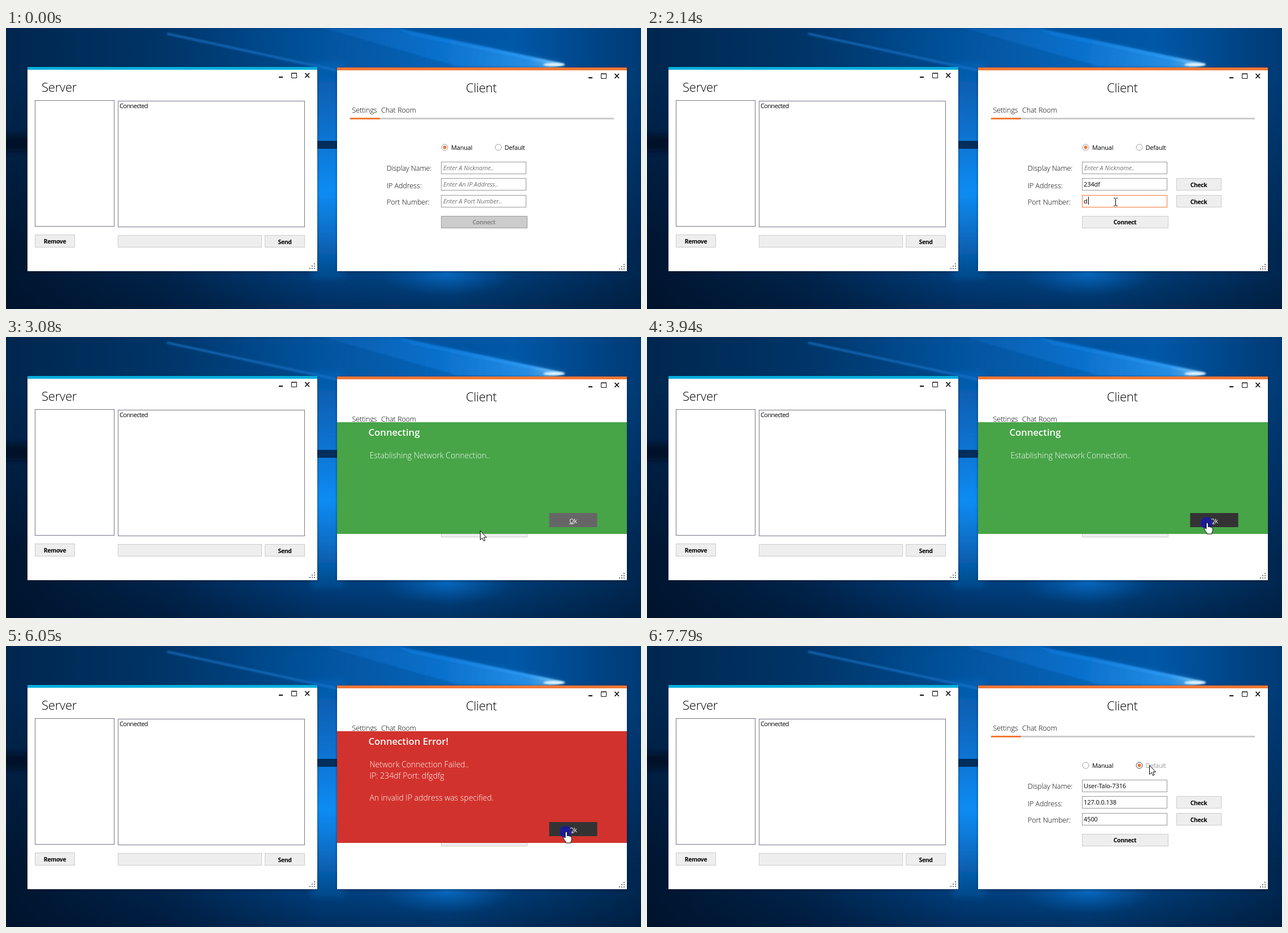
Recreate the animation shown at these times as an HTML page. Size 1124 by 498 pixels, loop 8 s.

```html
<!DOCTYPE html>
<html lang="en">
<head>
<meta charset="utf-8">
<title>Chat connection demo</title>
<style>
html, body { margin: 0; width: 100%; height: 100%; overflow: hidden; background: #012a57; }
svg { display: block; width: 100%; height: 100%; }
text { font: 11px "Open Sans", "Noto Sans", sans-serif; letter-spacing: -.2px; fill: #000; white-space: pre; }
.title { font-size: 22.2px; font-weight: 300; letter-spacing: -.3px; }
.label { font-size: 12.6px; font-weight: 300; letter-spacing: -.1px; }
.value { font-size: 11px; letter-spacing: -.1px; }
.hint { font-style: italic; letter-spacing: -.1px; fill: #757575; }
.frame { filter: drop-shadow(0 1px 2px rgba(0, 8, 25, .5)); }
.list { fill: #fff; stroke: #75758a; }
.field rect { fill: #fff; stroke: #999; }
.field.focus rect { stroke: #f37735; }
.btn rect { fill: #eee; stroke: #ccc; }
.btn text { font-size: 10.5px; font-weight: 700; letter-spacing: -.4px; text-anchor: middle; }
.btn.off rect { fill: #ccc; stroke: #9b9b9b; }
.btn.off text { fill: #888; }
.btn.hover rect { fill: #666; stroke: #666; }
.btn.press rect { fill: #333; stroke: #333; }
.btn.hover text, .btn.press text, #panel text { fill: #fff; }
#ok text { font-weight: 400; letter-spacing: -.1px; }
#panel .head { font-size: 16.8px; font-weight: 600; letter-spacing: -.05px; }
#panel .msg { font-size: 14px; font-weight: 300; letter-spacing: 0; }
.ring { fill: #fff; stroke: #999; }
.radio.hover .ring { stroke: #444; }
.radio.hover text { fill: #999; }
.dot { fill: #f37735; }
.pointer { fill: #fff; stroke: #000; stroke-linejoin: round; }
</style>
</head>
<body>
<svg viewBox="0 0 1124 498" preserveAspectRatio="none">
  <defs>
    <linearGradient id="sky">
      <stop offset="0" stop-color="#00264e"/>
      <stop offset=".25" stop-color="#003568"/>
      <stop offset=".5" stop-color="#004c92"/>
      <stop offset=".8" stop-color="#0058a8"/>
      <stop offset="1" stop-color="#003a74"/>
    </linearGradient>
    <linearGradient id="floor">
      <stop offset="0" stop-color="#00152f"/>
      <stop offset=".25" stop-color="#00234a"/>
      <stop offset=".5" stop-color="#003e7c"/>
      <stop offset=".7" stop-color="#004484"/>
      <stop offset="1" stop-color="#00264e"/>
    </linearGradient>
    <linearGradient id="fall" x2="0" y2="1">
      <stop offset=".2" stop-color="#fff" stop-opacity="0"/>
      <stop offset=".8" stop-color="#fff"/>
    </linearGradient>
    <mask id="low"><rect width="1124" height="498" fill="url(#fall)"/></mask>
    <linearGradient id="dusk" x2="0" y2="1">
      <stop offset=".88" stop-color="#001028" stop-opacity="0"/>
      <stop offset="1" stop-color="#001028" stop-opacity=".35"/>
    </linearGradient>
    <linearGradient id="gap" x2="0" y2="1">
      <stop offset="0" stop-color="#0557a6"/>
      <stop offset=".35" stop-color="#0a74d2"/>
      <stop offset=".6" stop-color="#0a8cf4"/>
      <stop offset=".8" stop-color="#086cc4"/>
      <stop offset="1" stop-color="#044888"/>
    </linearGradient>
    <radialGradient id="glow">
      <stop offset="0" stop-color="#0a78d8"/>
      <stop offset="1" stop-color="#0560b8" stop-opacity="0"/>
    </radialGradient>
    <radialGradient id="ray" gradientUnits="userSpaceOnUse" cx="990" cy="65" r="660">
      <stop offset="0" stop-color="#8fd6ff"/>
      <stop offset=".1" stop-color="#2f9df6"/>
      <stop offset=".35" stop-color="#0f7ee0" stop-opacity=".8"/>
      <stop offset=".7" stop-color="#0b6cc6" stop-opacity=".5"/>
      <stop offset="1" stop-color="#0a62bd" stop-opacity=".1"/>
    </radialGradient>
    <filter id="soft" x="-20%" y="-40%" width="140%" height="180%"><feGaussianBlur stdDeviation="5"/></filter>
    <filter id="haze" x="-20%" y="-60%" width="140%" height="220%"><feGaussianBlur stdDeviation="1.5"/></filter>
    <g id="chrome">
      <path d="M483 87.2h7" stroke="#000" stroke-width="2"/>
      <path d="M505.5 80.5h9v8h-9zM505 80h10" fill="none" stroke="#111"/>
      <path d="M529.5 80l7.5 8M537 80l-7.5 8" stroke="#000" stroke-width="1.6"/>
      <path d="M545 417h2v2h-2zM541 421h2v2h-2zM545 421h2v2h-2zM537 425h2v2h-2zM541 425h2v2h-2zM545 425h2v2h-2z" fill="#777"/>
    </g>
  </defs>

  <rect width="1124" height="498" fill="url(#sky)"/>
  <rect width="1124" height="498" fill="url(#floor)" mask="url(#low)"/>
  <rect width="1124" height="498" fill="url(#dusk)"/>
  <rect x="540" y="60" width="60" height="385" fill="url(#gap)" filter="url(#soft)"/>
  <ellipse cx="780" cy="435" rx="120" ry="40" fill="url(#glow)" opacity=".7"/>
  <path d="M270 0H690L990 65 900 80H590Z" fill="url(#ray)" opacity=".45" filter="url(#soft)"/>
  <path d="M285 10L590 76" stroke="#1a76cc" stroke-width="4" opacity=".7" filter="url(#haze)"/>
  <path d="M690 0L990 64 960 72 800 68 560 0Z" fill="url(#ray)" opacity=".6" filter="url(#haze)"/>
  <path d="M690 0L990 64 975 66 720 14Z" fill="url(#ray)" opacity=".8" filter="url(#haze)"/>
  <ellipse cx="970" cy="65" rx="19" ry="3" fill="#e2f4ff" filter="url(#haze)"/>
  <rect x="545" y="200" width="50" height="14" fill="#00264f" opacity=".9"/>
  <rect x="-10" y="190" width="60" height="28" fill="#000d22" opacity=".8" filter="url(#soft)"/>

  <g class="frame">
    <rect x="38" y="69" width="513" height="362" fill="#fff"/>
    <rect x="38" y="69" width="513" height="5" fill="#00aedb"/>
  </g>
  <use href="#chrome"/>
  <text class="title" x="63" y="113">Server</text>
  <rect class="list" x="51.5" y="128.5" width="140" height="223"/>
  <rect class="list" x="198.5" y="129.5" width="330" height="223"/>
  <text class="value" x="201" y="142" style="letter-spacing:-.6px">Connected</text>
  <g class="btn"><rect x="51.5" y="366.5" width="70" height="22"/><text x="86.5" y="382">Remove</text></g>
  <g class="btn"><rect x="198.5" y="367.5" width="254" height="21"/></g>
  <g class="btn"><rect x="458.5" y="367.5" width="70" height="21"/><text x="493.5" y="382.5">Send</text></g>

  <g class="frame">
    <rect x="586" y="70" width="513" height="361" fill="#fff"/>
    <rect x="586" y="70" width="513" height="5" fill="#f37735"/>
  </g>
  <use href="#chrome" x="548" y="1"/>
  <text class="title" x="814" y="114">Client</text>
  <text class="label" x="612.5" y="150">Settings</text>
  <text class="label" x="664" y="150">Chat Room</text>
  <path d="M609 160.5H1076" stroke="#ccc" stroke-width="3"/>
  <path d="M609 160.5H662" stroke="#f37735" stroke-width="3"/>

  <g class="radio">
    <circle class="ring" cx="776.5" cy="211.5" r="5.5"/><circle class="dot" id="dotA" cx="776.5" cy="211.5" r="3"/>
    <text x="788" y="216">Manual</text>
  </g>
  <g class="radio" id="auto">
    <circle class="ring" cx="871.5" cy="211.5" r="5.5"/><circle class="dot" id="dotB" cx="871.5" cy="211.5" r="3"/>
    <text x="882.5" y="216">Default</text>
  </g>

  <text class="label" x="674" y="252.5">Display Name:</text>
  <text class="label" x="674" y="283.5">IP Address:</text>
  <text class="label" x="674" y="312.5">Port Number:</text>
  <g id="name"><rect x="770.5" y="237.5" width="150" height="21"/><text y="251.5"/></g>
  <g id="ip"><rect x="770.5" y="266.5" width="150" height="21"/><text y="280.5"/></g>
  <g id="port"><rect x="770.5" y="296.5" width="150" height="21"/><text y="310.5"/></g>
  <rect id="caret" width="1" height="14"/>
  <g id="checkIp"><rect x="937.5" y="266.5" width="79" height="21"/><text x="976.5" y="281.5">Check</text></g>
  <g id="checkPort"><rect x="937.5" y="296.5" width="79" height="21"/><text x="976.5" y="311.5">Check</text></g>
  <g id="connect"><rect x="770.5" y="333.5" width="152" height="21"/><text x="846" y="348">Connect</text></g>

  <g id="panel">
    <rect id="sheet" x="586" y="151" width="513" height="198"/>
    <text class="head" id="head" x="641.5" y="174.5"/>
    <text class="msg" x="643.5" y="215"/>
    <text class="msg" x="643.5" y="234.5"/>
    <text class="msg" x="643.5" y="274"/>
    <g id="ok"><rect x="962" y="312.5" width="84" height="24"/><text x="1004" y="329.5"><tspan text-decoration="underline">O</tspan>k</text></g>
  </g>

  <g id="cursor">
    <circle id="press" cx="-.5" cy=".5" r="10.5" fill="#1a1a9e" opacity=".95"/>
    <path class="pointer" id="arrow" d="M.5 .5V16.5L4 13.2 6.4 18.5 9 17.4 6.7 12.2H11.5Z"/>
    <path class="pointer" id="hand" transform="translate(1 2)" d="M-2 9V0Q-2-2-.3-2 1.4-2 1.4 0V5.5Q4 4.5 5 6 7 5.2 7.6 7 9.3 6.6 9.3 8.5V12Q9.3 14 8 15.5V18H-1V16Q-3 14-5.5 10-6.3 8.3-5 7.8-3.8 7.5-2 9Z"/>
    <path id="beam" d="M-3-6.5H-.5L.5-5.5 1.5-6.5H4M.5-5.5V6M-3 7H-.5L.5 6 1.5 7H4" fill="none" stroke="#000"/>
  </g>
</svg>
<script>
const LOOP = 8000;
const $ = id => document.getElementById(id);
const show = (el, on) => { el.style.display = on ? '' : 'none'; };
const between = (t, a, b) => t >= a && t < b;
const ease = u => u * u * (3 - 2 * u);

// Pointer moves: first step, last step, number of steps, end point, optional bend.
const START = [1004, 480];
const MOVES = [
  [120, 500, 6, [824, 281]],
  [1900, 1980, 2, [829, 308]],
  [2610, 2760, 3, [839, 343]],
  [3460, 3860, 6, [991, 329]],
  [6290, 6610, 5, [977, 318]],
  [6850, 7620, 11, [889, 211], [960, 145]]
];
const CLICKS = [660, 1980, 2930, 3940, 6050, 7710];
const IP_KEYS = [1370, 1430, 1670, 1750, 1820];
const PORT_KEYS = [2140, 2220, 2300, 2380, 2460, 2530];
const BOXES = {
  name: [770, 237, 921, 259], ip: [770, 266, 921, 288], port: [770, 296, 921, 318],
  checkIp: [937, 266, 1017, 288], checkPort: [937, 296, 1017, 318],
  connect: [770, 333, 922, 355], ok: [961, 312, 1046, 337], auto: [865, 203, 919, 220]
};
const NOTES = {
  wait: ['#47a447', 'Connecting', 'Establishing Network Connection..', '', ''],
  fail: ['#d2322d', 'Connection Error!', 'Network Connection Failed..', 'IP: 234df Port: dfgdfg', 'An invalid IP address was specified.']
};
const lines = document.querySelectorAll('#panel .msg');

function pointerAt(t) {
  let p = START;
  for (const [from, to, n, end, bend] of MOVES) {
    if (t < from) break;
    const gap = (to - from) / (n - 1);
    const step = Math.min(n, Math.floor((t - from) / gap + 1e-6) + 1);
    const u = ease(step / n);
    p = p.map((a, i) => {
      const c = bend ? bend[i] : (a + end[i]) / 2;
      return (1 - u) * (1 - u) * a + 2 * u * (1 - u) * c + u * u * end[i];
    });
  }
  return p.map(Math.round);
}

const typed = (t, word, keys) => word.slice(0, keys.filter(k => k <= t).length);

function setField(id, value, hint, focus) {
  const el = $(id), text = el.lastElementChild, empty = !value && !focus;
  el.setAttribute('class', focus ? 'field focus' : 'field');
  text.setAttribute('class', empty ? 'hint' : 'value');
  text.setAttribute('x', empty ? 774 : 773);
  text.textContent = empty ? hint : value;
}

function setButton(id, state) {
  $(id).setAttribute('class', 'btn ' + state);
}

function draw(t) {
  const [x, y] = pointerAt(t);
  const note = between(t, 3010, 4020) ? 'wait' : between(t, 4110, 6130) ? 'fail' : '';
  const over = id => {
    const [l, top, r, b] = BOXES[id];
    return (id === 'ok') === !!note && x >= l && x < r && y >= top && y < b;
  };
  const clicking = CLICKS.some(c => between(t, c, c + (c === 660 ? 70 : 80)));
  const preset = t >= 7790;
  const focus = between(t, 660, 1980) ? 'ip' : between(t, 1980, 2930) ? 'port' : '';
  const ip = preset ? '127.0.0.138' : typed(t, '234df', IP_KEYS);
  const port = preset ? '4500' : typed(t, 'dfgdfg', PORT_KEYS);

  setField('name', preset ? 'User-Talo-7316' : '', 'Enter A Nickname..', false);
  setField('ip', ip, 'Enter An IP Address..', focus === 'ip');
  setField('port', port, 'Enter A Port Number..', focus === 'port');

  const caret = $('caret');
  show(caret, focus && !between(t, 1200, 1370));
  if (focus) {
    const text = $(focus).lastElementChild;
    caret.setAttribute('x', Math.round(773 + (text.textContent ? text.getComputedTextLength() + 1 : 0)));
    caret.setAttribute('y', BOXES[focus][1] + 3);
  }

  show($('checkIp'), ip);
  show($('checkPort'), port);
  for (const id of ['checkIp', 'checkPort']) setButton(id, over(id) ? 'hover' : '');
  setButton('connect', !port ? 'off' : over('connect') ? (clicking ? 'press' : 'hover') : '');
  setButton('ok', clicking ? 'press' : 'hover');

  show($('dotA'), !preset);
  show($('dotB'), preset);
  $('auto').setAttribute('class', over('auto') ? 'radio hover' : 'radio');

  show($('panel'), note);
  if (note) {
    const [color, head, ...msg] = NOTES[note];
    $('sheet').setAttribute('fill', color);
    $('head').textContent = head;
    lines.forEach((el, i) => { el.textContent = msg[i]; });
  }

  const typing = !note && ['name', 'ip', 'port'].some(over);
  const linking = over('ok');
  show($('cursor'), t >= 120);
  $('cursor').setAttribute('transform', `translate(${x} ${y})`);
  show($('press'), clicking);
  show($('beam'), typing);
  show($('hand'), linking);
  show($('arrow'), !typing && !linking);
}

const begin = performance.now();
function tick() {
  draw((performance.now() - begin) % LOOP);
  requestAnimationFrame(tick);
}
draw(0);
requestAnimationFrame(tick);
</script>
</body>
</html>
```
